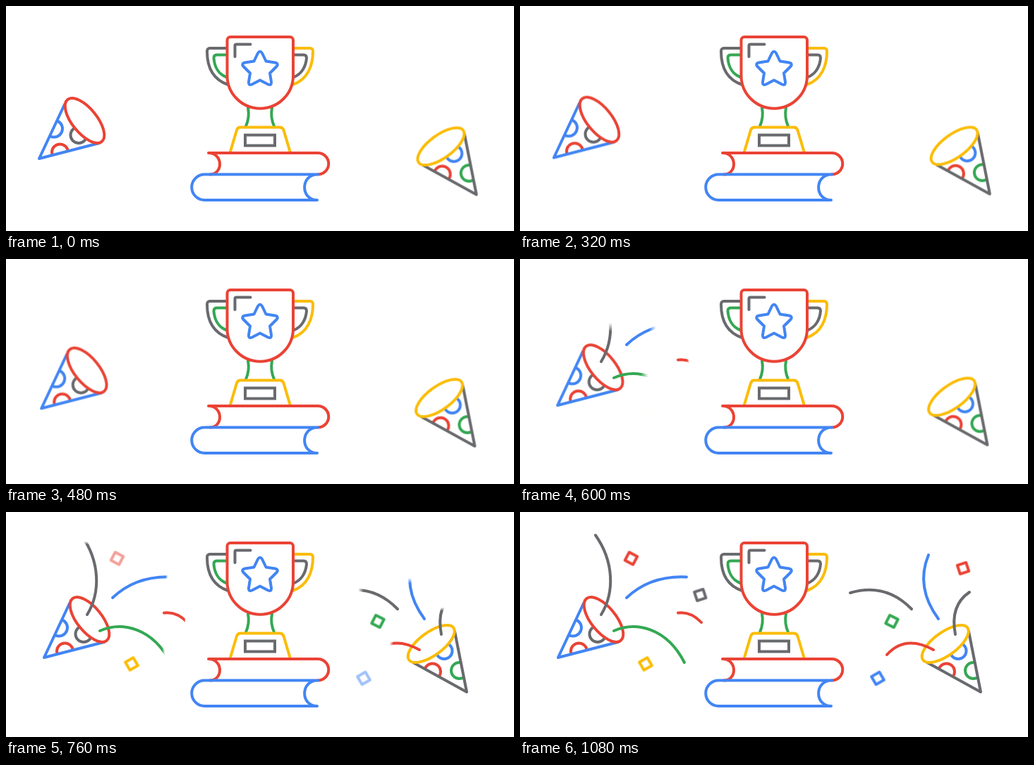
Write an HTML page that moves like this. It is 720 px wide and 320 px high and loops after 3 s.

```html
<!DOCTYPE html>
<html lang="en">
<head>
<meta charset="utf-8">
<title>Trophy celebration</title>
<style>
  html, body { margin: 0; width: 100%; height: 100%; overflow: hidden; background: #fff; }
  svg { display: block; width: 720px; height: 320px; }

  .art { fill: none; stroke-width: 4; stroke-linecap: round; stroke-linejoin: round; }
  .red { stroke: #ea4335; }
  .blue { stroke: #4285f4; }
  .green { stroke: #34a853; }
  .yellow { stroke: #fbbc04; }
  .gray { stroke: #696a6e; }
  .rim { fill: #fff; }
  .sharp { stroke-linejoin: miter; }

  .anim { animation: 3s linear infinite both; }
  .cone-left { animation-name: cone-left; }
  .cone-right { animation-name: cone-right; }
  .wipe-left { animation-name: wipe-left; }
  .wipe-right { animation-name: wipe-right; }
  .pop1 { animation-name: pop1; }
  .pop2 { animation-name: pop2; }
  .pop3 { animation-name: pop3; }

  @keyframes cone-left {
    0% { transform: translate(-7px, 10px); animation-timing-function: cubic-bezier(.32, 0, .67, 0); }
    20.83%, 100% { transform: none; }
  }
  @keyframes cone-right {
    0% { transform: translate(13.7px, 12.2px); animation-timing-function: cubic-bezier(.33, 0, 1, .1); }
    25.33%, 100% { transform: none; }
  }
  /* The soft edge narrows as each streamer reaches its full length. */
  @keyframes wipe-left {
    0%, 16.33% { transform: translate(-.1px, 0) scale(1, 1); animation-timing-function: cubic-bezier(.215, .61, .355, 1); }
    35.67%, 100% { transform: translate(1.1px, 0) scale(.05, 1); }
  }
  @keyframes wipe-right {
    0%, 20.33% { transform: translate(-.1px, 0) scale(1, 1); animation-timing-function: cubic-bezier(.215, .61, .355, 1); }
    39.67%, 100% { transform: translate(1.1px, 0) scale(.05, 1); }
  }
  @keyframes pop1 { 0%, 20% { opacity: 0; } 25.33%, 100% { opacity: 1; } }
  @keyframes pop2 { 0%, 22.67% { opacity: 0; } 28%, 100% { opacity: 1; } }
  @keyframes pop3 { 0%, 26% { opacity: 0; } 31.33%, 100% { opacity: 1; } }
</style>
</head>
<body>
<svg viewBox="0 0 720 320" xmlns="http://www.w3.org/2000/svg">
  <defs>
    <linearGradient id="edge" gradientUnits="userSpaceOnUse" x1="-.2" y1="0" x2="0" y2="0">
      <stop offset="0" stop-color="#fff"/>
      <stop offset="1" stop-color="#fff" stop-opacity="0"/>
    </linearGradient>
    <rect id="sweep" x="-60" y="-2" width="60" height="5" fill="url(#edge)"/>

    <mask id="left-out" maskContentUnits="objectBoundingBox" x="-1" y="-1" width="3" height="3">
      <g class="anim wipe-left"><use href="#sweep"/></g>
    </mask>
    <mask id="left-up" maskContentUnits="objectBoundingBox" x="-1" y="-1" width="3" height="3">
      <g transform="translate(0 1) rotate(-90)"><g class="anim wipe-left"><use href="#sweep"/></g></g>
    </mask>
    <mask id="right-out" maskContentUnits="objectBoundingBox" x="-1" y="-1" width="3" height="3">
      <g transform="translate(1 0) scale(-1 1)"><g class="anim wipe-right"><use href="#sweep"/></g></g>
    </mask>
    <mask id="right-up" maskContentUnits="objectBoundingBox" x="-1" y="-1" width="3" height="3">
      <g transform="translate(0 1) rotate(-90)"><g class="anim wipe-right"><use href="#sweep"/></g></g>
    </mask>

    <clipPath id="clip-left"><path d="M54 207L90 130L139 185z"/></clipPath>
    <clipPath id="clip-right"><path d="M653 256L636 170L577 214z"/></clipPath>
    <rect id="chip" x="-6.5" y="-6.5" width="13" height="13"/>
  </defs>

  <g class="art">
    <!-- Trophy -->
    <path class="gray" d="M313 60H289a4 4 0 0 0-4 4.5C285 84 291 104 315 112"/>
    <path class="green" d="M313 69.5H298.5q-4 0-4 4.5C295.500 86 301 97 312 101"/>
    <path class="yellow" d="M407 60H431a4 4 0 0 1 4 4.5C435 84 428 105 406 112"/>
    <path class="gray" d="M407 69.5H422q4 0 4 4.500C425 86 419 97 408 101"/>
    <path class="green" d="M343 145C345 155 343 164 340 171M377 145C375 155 377 164 380 171"/>
    <path class="red rim" d="M318 44H402.500a4.500 4.500 0 0 1 4.500 4.500V99a46.750 46.750 0 0 1-93.500 0V48.500A4.500 4.500 0 0 1 318 44z"/>
    <path class="gray" d="M324.500 72V56.500q0-2 2-2H346.500"/>
    <path class="blue" d="M357 67Q360 62.500 363 67L368.500 78.500L381.500 80.500Q387 82 383.500 86L374 95.500L376 108Q376.500 113.500 371.500 111.500L360 105.500L348.500 111.500Q343.500 113.500 344 108L346 95.500L336.500 86Q333 82 338.500 80.500L351.500 78.500z"/>
    <path class="yellow" d="M318 207L327 176.500Q328.500 172.500 332 172.500H388Q392 172.500 393.500 176.500L402.500 207"/>
    <rect class="gray sharp" x="339" y="183.500" width="42" height="15"/>

    <!-- Books -->
    <path class="red" d="M287 209H442a15.250 15.250 0 0 1 0 30.500M287 209C308 209 308 239.500 289 239.500"/>
    <path class="blue" d="M442 239.500H281.500a18.250 18.250 0 0 0 0 36.500H441C417 276 417 239.500 442 239.500"/>

    <!-- Party cones -->
    <g class="anim cone-left">
      <g clip-path="url(#clip-left)">
        <circle class="blue" cx="75" cy="164.500" r="12"/>
        <circle class="red" cx="83.500" cy="198" r="11.500"/>
        <circle class="gray" cx="110" cy="173.500" r="11.500"/>
      </g>
      <path class="blue" d="M90 130L54 207L139 185"/>
      <ellipse class="red rim" rx="38.500" ry="17.500" transform="translate(118.500 153) rotate(51)"/>
    </g>
    <g class="anim cone-right">
      <g clip-path="url(#clip-right)">
        <circle class="blue" cx="621" cy="197.500" r="11.500"/>
        <circle class="red" cx="604.500" cy="227" r="11.500"/>
        <circle class="green" cx="642.500" cy="225.500" r="11.500"/>
      </g>
      <path class="gray" d="M636 170L653 256L577 214"/>
      <ellipse class="yellow rim" rx="39" ry="16.500" transform="translate(602.700 187.500) rotate(-36)"/>
    </g>

    <!-- Streamers -->
    <path class="gray" mask="url(#left-up)" d="M115 146C134.500 114 133 70 107 33"/>
    <path class="blue" mask="url(#left-out)" d="M151 122Q185 90 236 92.500"/>
    <path class="red" mask="url(#left-out)" d="M224 143.500Q242 141 257 157"/>
    <path class="green" mask="url(#left-out)" d="M133 169C165 155 208 165 233 214"/>
    <path class="gray" mask="url(#right-out)" d="M555 138Q518 100 468 115"/>
    <path class="blue" mask="url(#right-up)" d="M593 152Q560 107 579 61"/>
    <path class="gray" mask="url(#right-up)" d="M617 174Q609 133 637 114"/>
    <path class="red" mask="url(#right-out)" d="M586 196Q546 174 520 203"/>

    <!-- Confetti -->
    <g class="anim pop1">
      <use class="yellow" href="#chip" transform="translate(178 216) rotate(-30)"/>
      <use class="green" href="#chip" transform="translate(527 155.500) rotate(27)"/>
    </g>
    <g class="anim pop2">
      <use class="red" href="#chip" transform="translate(157.500 66) rotate(28)"/>
      <use class="blue" href="#chip" transform="translate(507 236.500) rotate(-30)"/>
    </g>
    <g class="anim pop3">
      <use class="gray" href="#chip" transform="translate(255.300 118) rotate(-18)"/>
      <use class="red" href="#chip" transform="translate(628 80) rotate(-18)"/>
    </g>
  </g>
</svg>
</body>
</html>
```
